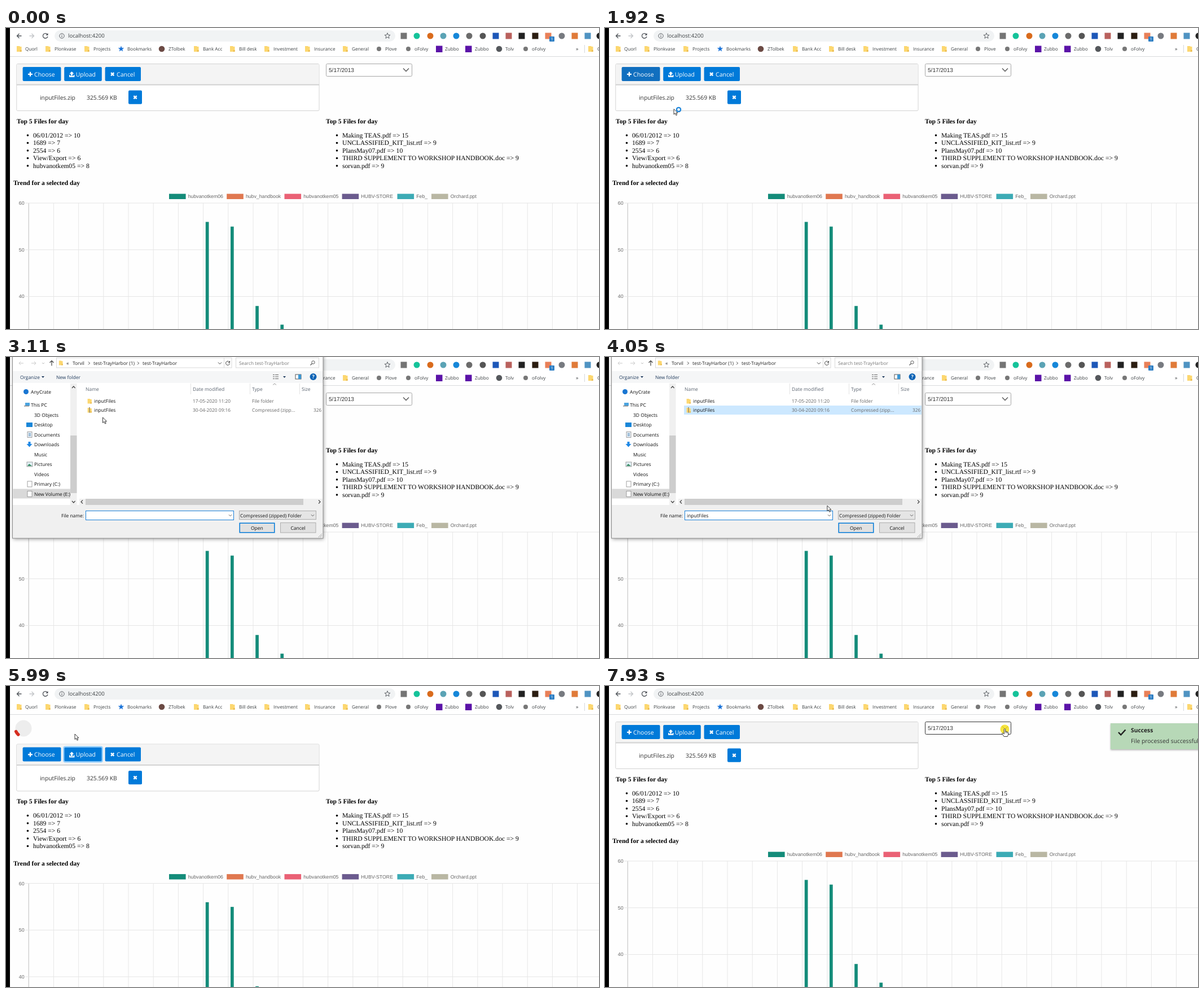
Recreate the animation shown at these times as an HTML page. Size 1051 by 533 pixels, loop 8000 ms.

```html
<!DOCTYPE html>
<html lang="en">
<head>
<meta charset="utf-8">
<style>
  html, body { margin: 0; width: 100%; height: 100%; overflow: hidden; background: #fff; }
  svg { display: block; }
  text { white-space: pre; text-rendering: geometricPrecision; }
  .ui { font-family: "Open Sans", sans-serif; }
  .serif { font-family: "Liberation Serif", serif; }
  .sans { font-family: "Liberation Sans", sans-serif; }
  .bold { font-weight: bold; }
</style>
</head>
<body>
<svg id="stage" width="1051" height="533" viewBox="0 0 1051 533" xmlns="http://www.w3.org/2000/svg"></svg>
<script>
const LOOP = 8000, SHIFT = 39.5;
const BLUE = '#007ad9', DARK = '#116fbf';

const text = (x, y, s, size, fill = '#333', cls = 'ui', extra = '') =>
  `<text x="${x}" y="${y}" font-size="${size}" fill="${fill}" class="${cls}" ${extra}>${s}</text>`;
const rect = (x, y, w, h, fill, extra = '') =>
  `<rect x="${x}" y="${y}" width="${w}" height="${h}" fill="${fill}" ${extra}/>`;
const circle = (x, y, r, fill, extra = '') =>
  `<circle cx="${x}" cy="${y}" r="${r}" fill="${fill}" ${extra}/>`;
const line = (d, color, w = 1, extra = '') =>
  `<path d="${d}" fill="none" stroke="${color}" stroke-width="${w}" ${extra}/>`;
const shape = (d, fill, extra = '') => `<path d="${d}" fill="${fill}" ${extra}/>`;
const group = (id, body, extra = '') => `<g id="${id}" ${extra}>${body}</g>`;
const range = n => [...Array(n).keys()];

const folder = (x, y, s = 1) =>
  `<g transform="translate(${x} ${y}) scale(${s})">${shape('M-4-5h5l1 1h2.500v9h-8.500z', '#fcd770')}${shape('M2.500 2h2v3h-3z', '#eab94c')}</g>`;
const star = (x, y, r) => 'M' + range(10).map(i => {
  const a = i * Math.PI / 5 - Math.PI / 2, q = i % 2 ? r * .42 : r;
  return `${(x + q * Math.cos(a)).toFixed(2)} ${(y + q * Math.sin(a)).toFixed(2)}`;
}).join('L') + 'z';
const cross = (x, y, r = 2.6) =>
  line(`M${x - r} ${y - r}l${2 * r} ${2 * r}m0 ${-2 * r}l${-2 * r} ${2 * r}`, '#fff', 2.4);
const chevron = (x, y, r, color, w = 1) => line(`M${x - r} ${y - r / 2}l${r} ${r}l${r} ${-r}`, color, w);

function browser() {
  let out = rect(0, 0, 1051, 50, '#fff') + rect(0, 50, 1051, 1, '#d8dadc') +
    rect(86, 4, 604, 20, '#f1f3f4', 'rx="10"') +
    line('M27.500 14h-8m4-4l-4 4l4 4', '#50545a', 1.3) +
    line('M41.500 14h8m-4-4l4 4l-4 4', '#c2c4c7', 1.3) +
    line('M73.300 11.500a4.300 4.300 0 1 0 .6 3.500', '#50545a', 1.3) + shape('M74.500 9v4h-4z', '#50545a') +
    circle(99, 14, 4.2, 'none', 'stroke="#5f6368"') + line('M99 13.300v3m0-5v1', '#5f6368', 1.1) +
    text(110, 17.3, 'localhost:4200', 9.6, '#3c4043') +
    line(star(676, 14, 5.3), '#5f6368', 1);

  const dots = [[728, '#15c39a'], [752, '#d96b1c'], [775, '#5ba3b5'], [798, '#1687d9'], [821, '#6b6b6b'],
    [845, '#555'], [985, '#777a80'], [1052, '#222']];
  const squares = [[705, '#757575'], [868, '#1d57b8'], [891, '#b9615d'], [914, '#222'], [938, '#2b1d10'],
    [961, '#e98058'], [1008, '#e07b39'], [1031, '#4f93c2']];
  out += dots.map(([x, c]) => circle(x, 14, 5.5, c)).join('') +
    squares.map(([x, c]) => rect(x - 5.5, 8.5, 11, 11, c)).join('') +
    rect(963, 15, 9, 9, '#2f7fc4', 'rx="1"') + text(965.7, 22.2, '1', 7, '#fff');

  const marks = [[19, 34, 'Quorl'], [70, 86, 'Plonkvase'], [139, 155, 'Projects'], [204, 215, 'Bookmarks', 'star'],
    [276, 288, 'ZTolbek', '#6b4a44'], [333, 349, 'Bank Acc'], [397, 413, 'Bill desk'], [458, 474, 'Investment'],
    [530, 546, 'Insurance'], [597, 613, 'General'], [661, 672, 'Plove', '#777'], [713, 724, 'oFolvy', '#777'],
    [768, 778, 'Zubbo', '#5b13a8', 1], [820, 831, 'Zubbo', '#5b13a8', 1], [874, 885, 'Tolv', '#55585c'],
    [921, 932, 'oFolvy', '#777'], [1032, 1048, 'C']];
  for (const [ix, x, label, mark, square] of marks) {
    out += !mark ? folder(ix + 4, 37) : mark === 'star' ? shape(star(ix, 37, 5.5), '#1a73d9')
      : square ? rect(ix - 6, 31.5, 11.5, 11.5, mark) : circle(ix, 37, mark === '#777' ? 4 : 5.3, mark);
    out += text(x, 40.3, label, 8.2, '#3c4043');
  }
  return out + text(1010, 40, '»', 9, '#3c4043') + rect(1025, 30, 1, 14, '#d5d7da');
}

const button = (id, x, w, label, icon) =>
  rect(x, 69, w, 25, BLUE, `id="${id}" rx="2"`) +
  rect(x - 1, 68, w + 2, 27, 'none', `id="${id}Ring" rx="3" stroke="#8dcdff" stroke-width="2"`) +
  icon + text(x + 20.5, 85.6, label, 10.45, '#fff');

function bullets(x, items) {
  return text(x, 168.8, 'Top 5 Files for day', 11.55, '#000', 'serif bold') + items.map((s, i) =>
    circle(x + 19.5, 190 + i * 13.5, 1.8, '#000') +
    text(x + 29, 193.6 + i * 13.5, s.replace('>', '&gt;'), 11.65, '#000', 'serif')).join('');
}

function chart() {
  const yOf = v => 310 + (60 - v) * 8.27;
  let out = text(13, 278.3, 'Trend for a selected day', 11.55, '#000', 'serif bold');
  [[289, 'hubvanotkem06', '#148c7a'], [391.2, 'hubv_handbook', '#e07850'], [493.5, 'hubvanotkem05', '#ea6175'],
    [595.6, 'HUBV-STORE', '#6b5b8e'], [693.5, 'Feb_', '#3cabb5'], [754, 'Orchard.ppt', '#b9b7a3']]
    .forEach(([x, s, c]) => out += rect(x, 293.6, 29.6, 9.4, c) + text(x + 33.7, 301.2, s, 8.75, '#666', 'sans'));
  out += range(23).map(i => rect(39.7 + i * 44.2, 310, 1, 280, i ? '#e7e7e7' : '#bcbcbc')).join('');
  for (const v of [60, 50, 40])
    out += rect(34, yOf(v) - .5, 1017, 1, '#e5e5e5') + text(32.5, yOf(v) + 3, v, 8.75, '#666', 'sans', 'text-anchor="end"');
  [56, 55, 38, 34].forEach((v, i) => out += rect(353.8 + i * 44.2, yOf(v) + .3, 5.7, 300, '#148c7a'));
  return out;
}

function page() {
  const plus = line('M43 77.800v8m-4-4h8', '#fff', 2.3);
  const up = shape('M116.500 77l4 4h-2.500v3.500h-3v-3.500h-2.500z', '#fff') + line('M113 83v3h7.500v-3', '#fff', 1.8);
  return rect(18.8, 63.5, 536.2, 83, '#fff', 'rx="2" stroke="#d3d3d3"') +
    rect(19.5, 64, 535, 36, '#f4f4f4') + rect(19, 99.5, 536, 2, '#d2d2d2') +
    button('choose', 29.6, 67.9, 'Choose', plus) + button('upload', 103.2, 66.6, 'Upload', up) +
    button('cancel', 175.6, 63.4, 'Cancel', cross(188.7, 81.8)) +
    text(60, 127, 'inputFiles.zip', 10.3) + text(143, 127, '325.569 KB', 10.3) +
    rect(217, 110.5, 24, 24.3, BLUE, 'rx="2"') + cross(229, 122.7) +
    bullets(19, ['06/01/2012 => 10', '1689 => 7', '2554 => 6', 'View/Export => 6', 'hubvanotkem05 => 8']) +
    bullets(567, ['Making TEAS.pdf => 15', 'UNCLASSIFIED_KIT_list.rtf => 9', 'PlansMay07.pdf => 10',
      'THIRD SUPPLEMENT TO WORKSHOP HANDBOOK.doc => 9', 'sorvan.pdf => 9']) + chart();
}

const select = () => rect(567.5, 63.5, 152, 22, '#fff', 'id="selectBox" rx="2" stroke="#a6a6a6"') +
  text(572, 77.5, '5/17/2013', 10.1, '#333', 'sans') + chevron(709, 74, 5, '#666', 1.6);

const toast = () => rect(896, 66, 170, 46, '#b7d8b7', 'filter="url(#soft)"') +
  line('M910 82l4.300 4.500l8.200-9', '#1e1e1e', 2.4) +
  text(932, 82, 'Success', 10.3, '#222', 'ui bold') + text(932, 101, 'File processed successfully', 10.3, '#333');

function navPane() {
  const items = ['AnyCrate', 'This PC', '3D Objects', 'Desktop', 'Documents', 'Downloads', 'Music', 'Pictures',
    'Videos', 'Primary (C:)', 'New Volume (E:)'];
  const frame = 'stroke="#8a8a8a" stroke-width=".8"';
  let out = rect(12.5, 233.5, 101.5, 17, '#d9d9d9');
  items.forEach((s, i) => {
    const y = i ? 70.5 + i * 17.5 : 64.7;
    out += text(i < 2 ? 44 : 50, y, s, 8.5, '#111');
    if (i === 1) out += rect(34, y - 7, 8, 5.5, '#4aa3df') + rect(32, y - 2, 9, 1.5, '#888');
    if (i === 3) out += rect(36, y - 7, 11, 8, '#1986d8');
    if (i === 4) out += rect(38, y - 8, 8, 10, '#e9f1f8', frame) + line(`M40 ${y - 5}h4m-4 2h4m-4 2h4`, '#5b8fb9');
    if (i === 5) out += shape(`M39.500 ${y - 8}h4v4h3l-5 5.500l-5-5.500h3z`, '#1e88e5');
    if (i === 7) out += rect(37, y - 7, 10, 8, '#e4f2f7', frame) + shape(`M38 ${y}l3-4l5 4z`, '#3c8f68');
    if (i > 8) out += rect(38, y - 8, 8, 10, '#fff', frame);
  });
  return out + circle(35.5, 61.5, 4.5, '#1976d2');
}

function files() {
  const rows = [['inputFiles', '17-05-2020 11:20', 'File folder', ''],
    ['inputFiles', '30-04-2020 09:16', 'Compressed (zipp...', '326']];
  return rect(140, 86, 421, 16, '#cce8ff', 'id="picked"') + rows.map(([n, d, k, size], i) => {
    const y = 81.3 + i * 16;
    return folder(148, y - 3, .85) + (i ? line(`M148 ${y - 8}v9`, '#666', 2, 'stroke-dasharray="1 1"') : '') +
      text(156, y, n, 8.5, '#111') + text(331, y, d, 8.35, '#666') + text(436, y, k, 8.35, '#666') + text(545, y, size, 8.3, '#666');
  }).join('');
}

function dialog() {
  const ink = '#1e395b', gray = '#777';
  let out = rect(12, -20, 550, 341, '#fff', 'filter="url(#deep)"') +
    rect(12, 25, 550, 21, '#f5f6f7') + rect(12, 262, 550, 59, '#f0f0f0') +
    rect(11.5, -20, 550.5, 341, 'none', 'stroke="#8c8c8c"') +
    line('M31 11h-8m3-3l-3 3l3 3M45 11h8m-3-3l3 3l-3 3', '#c9c9c9') + chevron(66, 11, 2, '#bbb') +
    line('M81 15.500v-9m-3.500 3.500l3.500-3.500l3.500 3.500', '#444', 1.2) +
    rect(89.5, 1.5, 310.5, 17.5, '#fff', 'stroke="#d9d9d9"') + folder(97, 10.5, .8) +
    text(107, 13.5, '«', 9) + text(118, 13.5, 'Torvil', 8.4, '#222') +
    text(155, 13.5, 'test-TrayHarbor (1)', 8.4, '#222') + text(242, 13.5, 'test-TrayHarbor', 8.4, '#222') +
    line('M146 8.500l2.500 2.500l-2.500 2.500M233 8.500l2.500 2.500l-2.500 2.500', '#444') + chevron(379, 11, 3, '#444') +
    line('M386.500 2v17', '#d9d9d9') + line('M396 9a3.500 3.500 0 1 0 .5 2.500M396.500 7v3h-3', '#444') +
    rect(407.5, 1.5, 147, 17.5, '#fff', 'stroke="#d9d9d9"') + text(413, 13.7, 'Search test-TrayHarbor', 8.3, gray) +
    circle(544.5, 9.5, 2.7, 'none', 'stroke="#555"') + line('M542.500 11.500l-3 3', '#555', 1.2) +
    text(25, 38.5, 'Organize', 8.4, ink) + shape('M63 34h5l-2.500 3z', ink) + text(89, 38.5, 'New folder', 8.4, ink) +
    line('M473 31.500h3m1 0h6m-10 3.500h3m1 0h6m-10 3.500h3m1 0h6', '#666', 1.2) + shape('M491 34h5l-2.500 3z', ink) +
    rect(513, 31, 10, 8, '#fff', 'stroke="#555"') + rect(518, 31, 5, 8, '#3a97d4') +
    circle(544.5, 35, 6, '#0c63b5') + text(542.4, 38.3, '?', 9, '#fff', 'ui bold') +
    line('M327.500 47v19M432.500 47v19M520.500 47v19', '#e3e3e3') + line('M473 49.500l3-2.500l3 2.500', '#999');
  [[141, 'Name'], [331, 'Date modified'], [436, 'Type'], [524, 'Size']]
    .forEach(([x, s]) => out += text(x, 59.6, s, 8.5, '#5b6470'));
  out += group('content', navPane() + files() + rect(114, 47, 11.5, 215, '#f0f0f0') + rect(114, 139, 11.5, 102, '#cdcdcd') +
    rect(130, 251, 431, 11, '#f0f0f0') + rect(141, 251, 386, 11, '#cdcdcd') +
    line('M117 55l2.800-3l2.800 3M117 255l2.800 3l2.800-3M136 253.500l-3 3l3 3M554 253.500l3 3l-3 3', '#444', 1.2));
  out += text(98, 283.5, 'File name:', 8.4, '#111') +
    rect(141.5, 272.5, 262, 16, '#fff', 'stroke="#1a80d8"') + text(145, 283.7, 'inputFiles', 8.5, '#111', 'ui', 'id="fileName"') +
    chevron(397.5, 280.5, 2.5, '#555') +
    rect(413.5, 272.5, 136, 15, '#e5e5e5', 'stroke="#adadad"') + text(415, 283.7, 'Compressed (zipped) Folder', 8.4, '#111') +
    chevron(543.5, 280.5, 2.5, '#555') +
    rect(414.2, 294.2, 61.6, 16.6, '#e1e1e1', 'id="open" stroke="#0078d7" stroke-width="1.5"') + text(434, 305.7, 'Open', 8.5, '#111') +
    rect(486.5, 293.5, 62.5, 17.5, '#e1e1e1', 'stroke="#adadad"') + text(504.500, 305.7, 'Cancel', 8.5, '#111') +
    line('M554 319l6-6M557 319l3-3', '#aaa', 1.2, 'stroke-dasharray="1.500 1"');
  return out;
}

const pointer = () =>
  group('arrow', shape('M0 0v9.500l2.300-2l1.700 3.700l1.700-.8l-1.700-3.500h3z', '#fff', 'stroke="#222" stroke-width=".9"')) +
  group('busy', circle(8.500, 1, 3.6, 'none', 'stroke="#2489dc" stroke-width="2.400"')) +
  group('hand', shape('M-1.200 1Q0-1 1.200 1v4q4 .2 5 2v4l-1.500 3h-6l-3.500-5q0-2 2-.8l1.600 1.300z', '#fff',
    'stroke="#222" stroke-width=".9"') + line('M1.200 5v3M3 5.500v2.500M4.700 6v2', '#444', .7));

const stage = document.getElementById('stage');
stage.innerHTML = `<defs>
  <filter id="soft" x="-10%" y="-20%" width="120%" height="150%"><feDropShadow dx="0" dy="1.500" stdDeviation="1.500" flood-opacity=".3"/></filter>
  <filter id="deep" x="-5%" y="-5%" width="110%" height="112%"><feDropShadow dx="1" dy="1.500" stdDeviation="3" flood-opacity=".4"/></filter>
  </defs>` + rect(0, 0, 1051, 533, '#fefefe') + group('page', page()) + group('select', select()) +
  group('spinner', circle(0, 0, 14.5, '#ededed') +
    circle(0, 0, 14.4, 'none', 'id="arc" stroke="#d62d20" stroke-width="5.600" stroke-linecap="round"'),
    'transform="translate(31 75)"') +
  group('toast', toast()) + browser() + rect(0, 0, 7, 533, '#000') + group('dialog', dialog()) +
  circle(0, 0, 8, '#f5e01e', 'id="click" fill-opacity=".85"') + group('pointer', pointer());

const el = {};
stage.querySelectorAll('[id]').forEach(n => el[n.id] = n);
const show = (id, on) => el[id].setAttribute('display', on ? 'inline' : 'none');
const set = (id, name, value) => el[id].setAttribute(name, value);
const clamp = v => Math.max(0, Math.min(1, v));
const smooth = v => v * v * (3 - 2 * v);
const mix = (a, b, k) => a + (b - a) * k;

// Pointer stops: time, x, y
const stops = [[70, 577, 405], [840, 67, 80], [1250, 67, 80], [1700, 148, 160], [1780, 146, 160], [1920, 122, 143.5],
  [2560, 150, 128], [2680, 150, 128], [3110, 171.5, 107], [3440, 176, 94], [3640, 176, 94], [4210, 445, 303],
  [4400, 445, 303], [4740, 181.5, 71], [5140, 136, 80], [5400, 136, 80], [5760, 126, 34], [5990, 122, 85],
  [6070, 122, 85], [6770, 457, 201.5], [6840, 578, 202], [6910, 582, 202], [7690, 708.5, 75.5], [8000, 708.5, 75.5]];

function pointerAt(t) {
  const i = Math.max(1, stops.findIndex(s => s[0] > t));
  const [a, b] = [stops[i - 1], stops[i]];
  const k = smooth(clamp((t - a[0]) / (b[0] - a[0])));
  return [mix(a[1], b[1], k), mix(a[2], b[2], k)];
}

// The dash grows, then runs off the end while the whole ring turns.
function spin(t) {
  const phase = ((t - 5850) / 1500 % 1 + 1) % 1, unit = .72;
  const grow = smooth(clamp(phase * 2)), leave = smooth(clamp(phase * 2 - 1));
  set('arc', 'stroke-dasharray', `${mix(1, 89, grow) * unit} ${200 * unit}`);
  set('arc', 'stroke-dashoffset', -mix(35 * grow, 124, leave) * unit);
  set('arc', 'transform', `rotate(${121 + (t - 5990) * .18})`);
}

function render(t) {
  const within = (a, b) => t >= a && t < b;
  const loading = within(5620, 6400), open = within(2060, 4440);
  const [x, y] = pointerAt(t), top = loading ? SHIFT : 0;
  const over = (l, r, a, b) => !open && x > l && x < r && y > a + top && y < b + top;
  const onSelect = !loading && over(567, 720, 63, 86), onUpload = over(103, 170, 69, 94);
  const hand = onSelect || onUpload || over(30, 97, 69, 94) || over(176, 239, 69, 94);

  set('page', 'transform', `translate(0 ${top})`);
  show('select', !loading);
  set('selectBox', 'stroke', onSelect ? '#333' : '#a6a6a6');
  show('spinner', loading);
  if (loading) spin(t);
  const rise = smooth(clamp((t - 6400) / 300));
  set('toast', 'opacity', rise);
  set('toast', 'transform', `translate(0 ${(1 - rise) * 40})`);

  set('choose', 'fill', within(990, 5230) || over(30, 97, 69, 94) ? DARK : BLUE);
  set('upload', 'fill', onUpload ? DARK : BLUE);
  show('chooseRing', within(1000, 1500) || within(4440, 5250));
  show('uploadRing', within(5250, 7800));
  show('cancelRing', false);

  show('dialog', open);
  show('content', t > 2680);
  show('picked', t > 3520);
  show('fileName', t > 3560);
  set('open', 'fill', t > 4150 ? '#e5f1fb' : '#e1e1e1');

  show('pointer', t >= 70);
  show('hand', hand);
  show('arrow', !hand);
  show('busy', within(1300, 2560) && !hand);
  set('pointer', 'transform', `translate(${x} ${y})`);
  show('click', [990, 3500, 4300, 5230].some(c => within(c, c + 170)) || t >= 7770);
  set('click', 'cx', x);
  set('click', 'cy', y + 1);
}

function tick(now) {
  render(now % LOOP);
  requestAnimationFrame(tick);
}
render(0);
requestAnimationFrame(tick);
</script>
</body>
</html>
```
